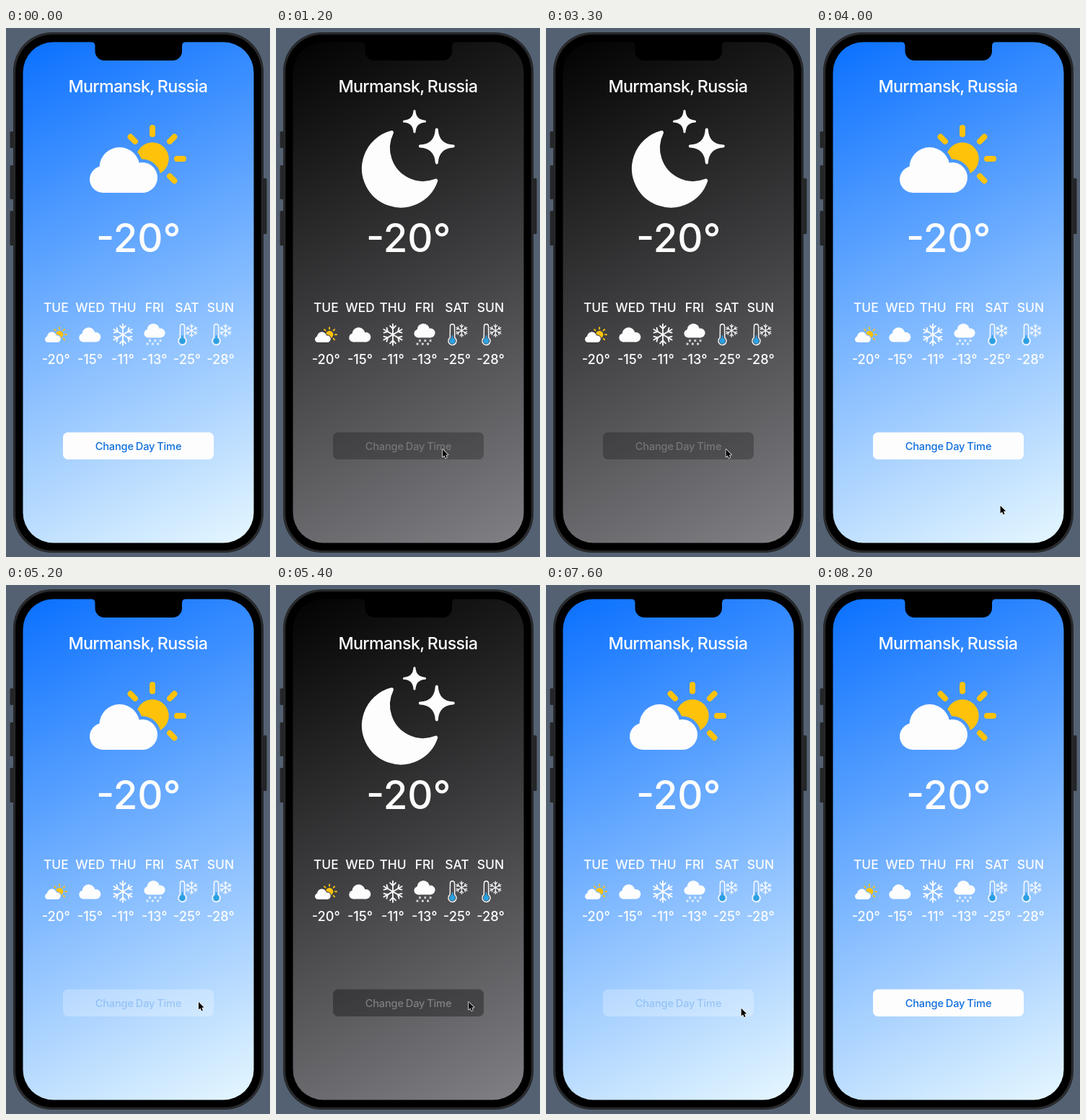
Recreate the animation shown at these times as an HTML page with a canvas. Size 366 px wide and 732 px high, loop 8800 ms.

```html
<!DOCTYPE html>
<html lang="en">
<head>
<meta charset="utf-8">
<title>Weather</title>
<style>
  html, body { margin: 0; width: 100%; height: 100%; overflow: hidden; background: #536172; }
  canvas { display: block; width: 366px; height: 732px; }
</style>
</head>
<body>
<canvas id="stage"></canvas>
<script>
const W = 366, H = 732, LOOP = 8800, STEP = 100, TAU = Math.PI * 2;
const FONT = 'Inter, Roboto, "Liberation Sans", sans-serif';
const SUN = '#fec20a', WHITE = '#fdfdfe';
const SCREEN = { x: 23.5, y: 19.5, w: 320, h: 693 };
const SKY = {
  day: ['#0a70ff', '#78b4ff', '#e6f7ff'],
  night: ['#020202', '#3f3f41', '#808085']
};

const canvas = document.getElementById('stage');
const ctx = canvas.getContext('2d');
const dpr = window.devicePixelRatio || 1;
canvas.width = W * dpr;
canvas.height = H * dpr;

// [press, release] of each tap; a release toggles day and night
const TAPS = [[1200, 1200], [3300, 3400], [5200, 5300], [7500, 7600]];

// Pointer waypoints: time, x, y
const PATH = [
  [100, 262, 704], [800, 231, 583], [1300, 231, 583],
  [2000, 249, 582.6], [2100, 249.5, 583], [3400, 249.5, 583],
  [4000, 255.6, 661], [4300, 255.6, 661], [4500, 255.2, 660.8],
  [4700, 255.2, 660.8], [5200, 267, 577], [5600, 267, 577],
  [6100, 276, 591], [6200, 276, 591], [6600, 270.7, 585.8],
  [7600, 270.7, 585.8], [8100, 284, 698], [8200, 288, 712]
];

const DAYS = [
  { name: 'TUE', temp: '-20°', x: 69.3 },
  { name: 'WED', temp: '-15°', x: 116.5 },
  { name: 'THU', temp: '-11°', x: 162 },
  { name: 'FRI', temp: '-13°', x: 205.8 },
  { name: 'SAT', temp: '-25°', x: 251 },
  { name: 'SUN', temp: '-28°', x: 297.5 }
];

// Cloud lobes: centre x, centre y, radius
const LOBES = [[134.5, 209.5, 18.5], [157.5, 193, 28], [189, 207, 21]];

function box(x, y, w, h, r, fill) {
  ctx.beginPath();
  ctx.roundRect(x, y, w, h, r);
  ctx.fillStyle = fill;
  ctx.fill();
}

function disc(x, y, r, fill) {
  ctx.beginPath();
  ctx.arc(x, y, r, 0, TAU);
  ctx.fillStyle = fill;
  ctx.fill();
}

function stroke(points, width, color) {
  ctx.beginPath();
  points.forEach(([x, y], i) => i ? ctx.lineTo(x, y) : ctx.moveTo(x, y));
  ctx.lineWidth = width;
  ctx.lineCap = ctx.lineJoin = 'round';
  ctx.strokeStyle = color;
  ctx.stroke();
}

function fillRound(width) {
  ctx.closePath();
  ctx.lineWidth = width;
  ctx.lineJoin = 'round';
  ctx.fillStyle = ctx.strokeStyle = WHITE;
  ctx.fill();
  ctx.stroke();
}

function text(str, x, y, size, weight, color = WHITE, tracking = 0) {
  ctx.font = `${weight} ${size}px ${FONT}`;
  ctx.letterSpacing = `${size * tracking}px`;
  ctx.wordSpacing = `${size * -0.06}px`;
  ctx.textAlign = 'center';
  ctx.fillStyle = color;
  ctx.fillText(str, x, y);
}

function at(x, y, scale, draw) {
  ctx.save();
  ctx.translate(x, y);
  ctx.scale(scale, scale);
  draw();
  ctx.restore();
}

function cloud() {
  for (const [x, y, r] of LOBES) disc(x, y, r, WHITE);
  box(134, 195, 55, 33, 2, WHITE);
}

function sunAndCloud() {
  ctx.save();
  // Keep a clear gap between sun and cloud
  for (const [x, y, r] of LOBES) {
    ctx.beginPath();
    ctx.rect(60, 100, 250, 180);
    ctx.arc(x, y, r + 4.5, 0, TAU);
    ctx.clip('evenodd');
  }
  disc(203, 181, 22.7, SUN);
  for (let i = -3; i <= 1; i++) {
    const c = Math.cos(i * TAU / 8), s = Math.sin(i * TAU / 8);
    stroke([[203 + 34 * c, 181 + 34 * s], [203 + 43 * c, 181 + 43 * s]], 8, SUN);
  }
  ctx.restore();
  cloud();
}

function snowflake(x, y, r, width) {
  for (let i = 0; i < 6; i++) {
    ctx.save();
    ctx.translate(x, y);
    ctx.rotate(i * TAU / 6);
    stroke([[0, 0], [0, -r]], width, WHITE);
    stroke([[-r * 0.27, -r * 0.83], [0, -r * 0.56], [r * 0.27, -r * 0.83]], width, WHITE);
    ctx.restore();
  }
}

function miniFlake(x, y) {
  for (let i = 0; i < 3; i++) {
    const dx = 1.5 * Math.sin(i * TAU / 6), dy = 1.5 * Math.cos(i * TAU / 6);
    stroke([[x - dx, y - dy], [x + dx, y + dy]], 0.8, WHITE);
  }
}

function snowCloud() {
  at(206 - 163 * 0.31, 409 - 165 * 0.31, 0.31, cloud);
  for (let i = 0; i < 3; i++) {
    miniFlake(199.5 + i * 7.3, 432.6);
    miniFlake(196 + i * 7.3, 437.2);
  }
}

function thermometer(x) {
  const a = 0.95;
  ctx.beginPath();
  ctx.arc(x, 412.8, 3, Math.PI, 0);
  ctx.arc(x, 433, 5.6, -a, Math.PI + a);
  ctx.closePath();
  ctx.lineWidth = 1.4;
  ctx.lineJoin = 'round';
  ctx.strokeStyle = WHITE;
  ctx.stroke();
  stroke([[x, 426], [x, 432]], 2, '#2ba0e0');
  disc(x, 433, 3.9, '#2ba0e0');
  snowflake(x + 12.8, 418.8, 8.6, 1.2);
}

function star(x, y, r, width) {
  const c = r * 0.05;
  ctx.beginPath();
  ctx.moveTo(x, y - r);
  ctx.quadraticCurveTo(x + c, y - c, x + r, y);
  ctx.quadraticCurveTo(x + c, y + c, x, y + r);
  ctx.quadraticCurveTo(x - c, y + c, x - r, y);
  ctx.quadraticCurveTo(x - c, y - c, x, y - r);
  fillRound(width);
}

function moonAndStars() {
  const ox = 173, oy = 194.5, R = 51.5, ix = 204, iy = 166, r = 48.5;
  const d = Math.hypot(ix - ox, iy - oy);
  const dir = Math.atan2(iy - oy, ix - ox);
  const outer = Math.acos((R * R - r * r + d * d) / (2 * R * d));
  const inner = Math.acos((r * r - R * R + d * d) / (2 * r * d));
  ctx.beginPath();
  ctx.arc(ox, oy, R, dir + outer, dir - outer + TAU);
  ctx.arc(ix, iy, r, dir + Math.PI + inner, dir + Math.PI - inner, true);
  fillRound(5);
  star(222.8, 163.5, 23, 4);
  star(192, 129.3, 14.6, 3);
}

function backdrop(colors) {
  const { x, y, w, h } = SCREEN;
  const g = ctx.createLinearGradient(x, y, x + w, y + h);
  colors.forEach((c, i) => g.addColorStop(i / (colors.length - 1), c));
  box(x, y, w, h, 42, g);
}

function phone() {
  const metal = '#252628';
  for (const [y, h] of [[143, 23], [190, 47], [253, 48]]) box(5.5, y, 5, h, 1.5, metal);
  box(356.5, 208, 5, 77, 1.5, metal);
  box(10, 6, 347, 720, 54, '#232426');
  box(11.3, 7.3, 344.4, 717.4, 53, '#313235');
  box(12.6, 8.6, 341.8, 714.8, 52, '#0d0d0e');
  box(14, 10, 339, 712, 50, '#000');
}

function notch() {
  ctx.beginPath();
  ctx.moveTo(118, 19);
  ctx.quadraticCurveTo(123.5, 19.5, 123.5, 25);
  ctx.arcTo(123.5, 45, 136, 45, 13);
  ctx.arcTo(244, 45, 244, 25, 13);
  ctx.lineTo(244, 25);
  ctx.quadraticCurveTo(244, 19.5, 249.5, 19);
  ctx.fillStyle = '#000';
  ctx.fill();
}

function forecast() {
  for (const { name, temp, x } of DAYS) {
    text(name, x, 393, 17.4, 500);
    text(temp, x, 464.6, 18.2, 500);
  }
  at(54 - 116 * 0.231, 413.4 - 134 * 0.231, 0.231, sunAndCloud);
  at(116.3 - 163 * 0.32, 414.3 - 165 * 0.32, 0.32, cloud);
  snowflake(162, 424.3, 14.6, 1.8);
  snowCloud();
  thermometer(244.5);
  thermometer(291.5);
}

function button(night, alpha) {
  ctx.save();
  ctx.globalAlpha = alpha;
  box(79, 559.5, 209, 37.5, 7, night ? '#000' : WHITE);
  text('Change Day Time', 183.5, 583.6, 14.6, 500, night ? WHITE : '#0f6fdd', -0.01);
  ctx.restore();
}

function pointer(x, y) {
  ctx.beginPath();
  for (const [dx, dy] of [[0, 0], [0, 10.6], [2.4, 8.4], [4.1, 12.2], [5.9, 11.4], [4.3, 7.7], [7.5, 7.5]]) {
    ctx.lineTo(x + dx, y + dy);
  }
  ctx.closePath();
  ctx.lineWidth = 1.5;
  ctx.lineJoin = 'round';
  ctx.strokeStyle = '#f4f4f4';
  ctx.stroke();
  ctx.fillStyle = '#000';
  ctx.fill();
}

function pointerAt(t) {
  if (t < PATH[0][0] || t >= PATH[PATH.length - 1][0]) return null;
  const i = PATH.findIndex(p => p[0] > t);
  const [t0, x0, y0] = PATH[i - 1], [t1, x1, y1] = PATH[i];
  const k = (t - t0) / (t1 - t0), e = k * k * (3 - 2 * k);
  return [x0 + (x1 - x0) * e, y0 + (y1 - y0) * e];
}

function buttonAlpha(t) {
  const tap = TAPS.filter(([press]) => press <= t).pop();
  if (!tap) return 1;
  const k = Math.min(1, Math.max(0, (t - tap[1]) / 300));
  return 0.25 + 0.75 * k * k;
}

function draw(t) {
  const night = TAPS.filter(([, release]) => release <= t).length % 2 === 1;
  ctx.setTransform(dpr, 0, 0, dpr, 0, 0);
  ctx.fillStyle = '#536172';
  ctx.fillRect(0, 0, W, H);
  phone();
  backdrop(night ? SKY.night : SKY.day);
  notch();
  text('Murmansk, Russia', 182.8, 89.3, 23.3, 500, WHITE, -0.028);
  if (night) moonAndStars(); else sunAndCloud();
  text('-20°', 183.8, 309.8, 54.6, 500);
  forecast();
  button(night, buttonAlpha(t));
  const p = pointerAt(t);
  if (p) pointer(...p);
}

const start = performance.now();
function frame() {
  const t = (performance.now() - start) % LOOP;
  draw(Math.floor(t / STEP) * STEP);
  requestAnimationFrame(frame);
}
frame();
</script>
</body>
</html>
```
